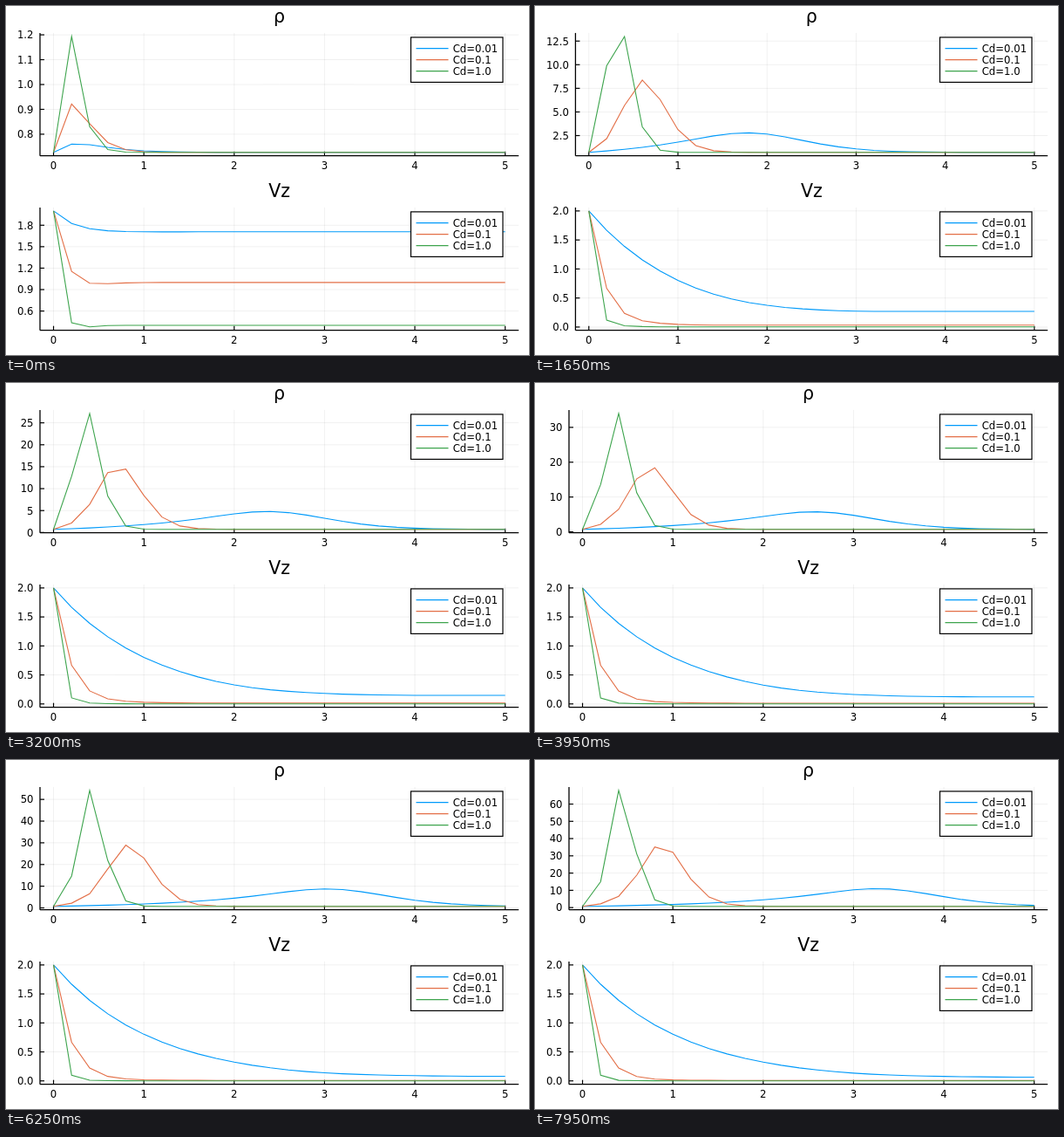
These frames come from a looping animation (600 by 400 pixels, 8 s). An HTML page with a canvas:

```html
<!DOCTYPE html>
<html lang="en">
<head>
<meta charset="utf-8">
<style>
  html, body { margin: 0; width: 100%; height: 100%; overflow: hidden; background: #fff; }
  canvas { display: block; }
</style>
</head>
<body>
<canvas id="stage" width="600" height="400"></canvas>
<script>
const ctx = document.getElementById('stage').getContext('2d');

// Gas with quadratic drag on a 1D grid: implicit Euler in time, upwind in space.
const STEPS = 160, STEP_MS = 50;
const CELLS = 26, DZ = 0.2, DT = 0.1, RHO_IN = 0.727, V_IN = 2;
const SERIES = [
  { label: 'Cd=0.01', cd: 0.01, color: '#009afa' },
  { label: 'Cd=0.1', cd: 0.1, color: '#e36f47' },
  { label: 'Cd=1.0', cd: 1, color: '#3da44d' },
];

function advance({ rho, v }, cd) {
  const c = DT / DZ, drag = 100 * cd * DT;
  const next = { rho: [RHO_IN], v: [V_IN] };
  for (let i = 1; i < CELLS; i++) {
    const vLeft = next.v[i - 1];
    const inflow = c * next.rho[i - 1] * vLeft;
    const mass = rho[i] + inflow;
    const momentum = rho[i] * v[i] + inflow * vLeft;
    // Mass and momentum balance combine to a quadratic for the new velocity.
    const a = mass * (c + drag), b = mass - c * momentum;
    const speed = (-b + Math.sqrt(b * b + 4 * a * momentum)) / (2 * a);
    next.v.push(speed);
    next.rho.push(mass / (1 + c * speed));
  }
  return next;
}

function simulate({ cd }) {
  let state = { rho: Array(CELLS).fill(RHO_IN), v: Array(CELLS).fill(V_IN) };
  return Array.from({ length: STEPS }, () => (state = advance(state, cd)));
}

const runs = SERIES.map(simulate);

// Axis ticks: reward about five ticks, good coverage and round steps.
const STEP_SCORES = [[5, 0.9], [3, 0.2], [2.5, 0.5], [2, 0.7], [1, 1]];

function chooseTicks(lo, hi) {
  const span = hi - lo;
  const top = Math.ceil(Math.log10(span));
  let best = { score: -Infinity };
  for (let z = top; z > top - 3; z--) {
    for (const [q, nice] of STEP_SCORES) {
      const step = q * 10 ** z;
      const first = Math.ceil(lo / step), last = Math.floor(hi / step);
      const count = last - first + 1;
      if (count < 4 || count > 8) continue;
      const score = (1 - Math.abs(count - 5) / 5) / 4
        + span / ((count - 1) * step) / 2 + nice / 4;
      if (score > best.score + 1e-9) {
        const decimals = Math.max(0, -z + (q === 2.5 ? 1 : 0));
        best = { score, step, first, count, decimals };
      }
    }
  }
  return Array.from({ length: best.count }, (_, i) => {
    const value = (best.first + i) * best.step;
    return { value, label: Math.abs(value).toFixed(best.decimals) };
  });
}

const RIGHT = 588.2, HEIGHT = 140.8, PAD = 0.03;
const FONT = '"DejaVu Sans", sans-serif';
const SMALL = `11.7px ${FONT}`, LARGE = `20.5px ${FONT}`;

function stroke(points, color, width) {
  ctx.beginPath();
  for (const [x, y] of points) ctx.lineTo(x, y);
  ctx.strokeStyle = color;
  ctx.lineWidth = width;
  ctx.stroke();
}

function text(string, x, y, align, font = SMALL) {
  ctx.font = font;
  ctx.textAlign = align;
  ctx.fillStyle = '#000';
  ctx.fillText(string, x, y);
}

function layout(title, top, curves) {
  const all = curves.flat();
  const min = Math.min(...all), max = Math.max(...all);
  const margin = PAD * (max - min);
  const lo = min - margin, hi = max + margin;
  return { title, top, curves, lo, hi, ticks: chooseTicks(lo, hi) };
}

function drawLegend(top) {
  ctx.fillStyle = '#fff';
  ctx.fillRect(464.5, top + 5, 105.5, 51.5);
  ctx.strokeStyle = '#000';
  ctx.lineWidth = 1.2;
  ctx.strokeRect(464.5, top + 5, 105.5, 51.5);
  SERIES.forEach(({ label, color }, i) => {
    const y = top + 17.7 + 13 * i;
    stroke([[470.5, y], [507.5, y]], color, 1.1);
    text(label, 512.7, y + 4.3, 'left');
  });
}

function drawPlot({ title, top, curves, lo, hi, ticks }, left) {
  const bottom = top + HEIGHT;
  const unit = (RIGHT - left) / (5 * (1 + 2 * PAD));
  const px = z => left + (z + 5 * PAD) * unit;
  const py = value => bottom - (value - lo) / (hi - lo) * HEIGHT;
  const grid = 'rgba(0,0,0,0.06)';

  for (let z = 0; z <= 5; z++) stroke([[px(z), top], [px(z), bottom]], grid, 1);
  for (const { value } of ticks) stroke([[left, py(value)], [RIGHT, py(value)]], grid, 1);

  stroke([[left, top], [left, bottom]], '#000', 1.3);
  stroke([[left, bottom], [RIGHT, bottom]], '#000', 1.3);
  for (let z = 0; z <= 5; z++) {
    stroke([[px(z), bottom], [px(z), bottom - 5]], '#000', 1.2);
    text(z, px(z), bottom + 15.6, 'center');
  }
  for (const { value, label } of ticks) {
    stroke([[left, py(value)], [left + 5, py(value)]], '#000', 1.2);
    text(label, left - 7.5, py(value) + 4.3, 'right');
  }
  text(title, (left + RIGHT) / 2, top - 12.4, 'center', LARGE);

  curves.forEach((curve, s) =>
    stroke(curve.map((value, i) => [px(i * DZ), py(value)]), SERIES[s].color, 1.1));
  drawLegend(top);
}

function draw(step) {
  const states = runs.map(run => run[step]);
  const plots = [
    layout('ρ', 30.9, states.map(s => s.rho)),
    layout('Vz', 230.9, states.map(s => s.v)),
  ];
  // Both plots share a left edge that makes room for the widest label.
  ctx.font = SMALL;
  const width = label => ctx.measureText(label).width;
  const widest = Math.max(...plots.flatMap(p => p.ticks.map(t => width(t.label))));
  const left = 39 + widest - width('0.0');

  ctx.fillStyle = '#fff';
  ctx.fillRect(0, 0, 600, 400);
  for (const plot of plots) drawPlot(plot, left);
}

function tick() {
  draw(Math.floor(performance.now() / STEP_MS) % STEPS);
  requestAnimationFrame(tick);
}
tick();
</script>
</body>
</html>
```
